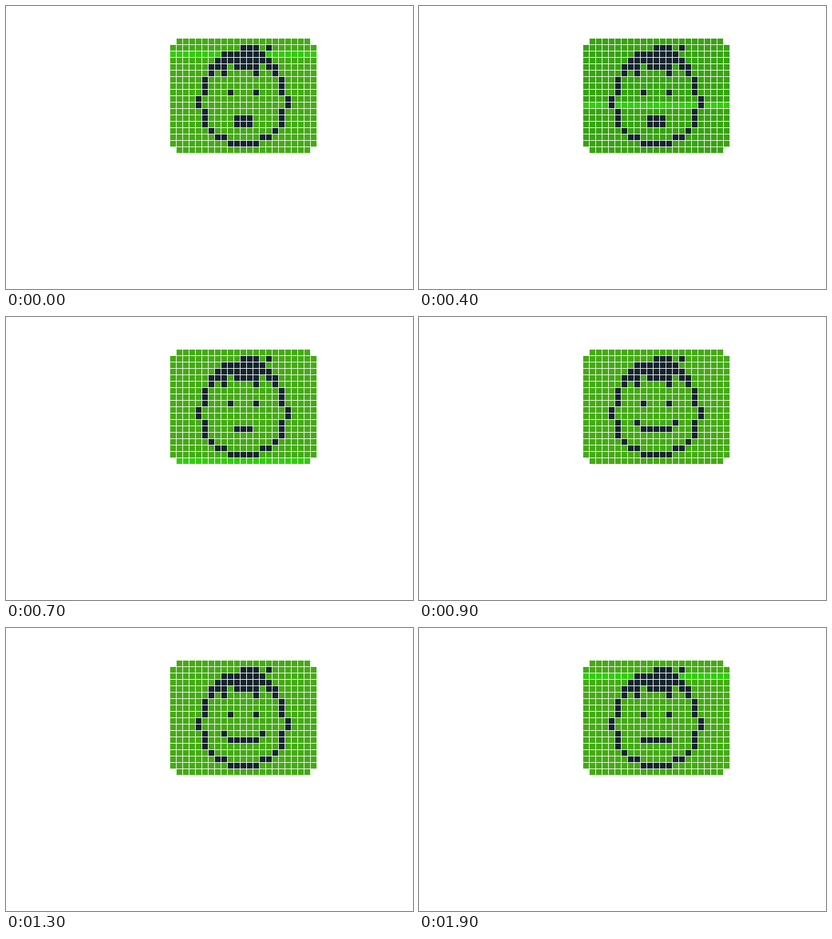
Write an HTML page that moves like this. It is 637 px wide and 443 px high and loops after 2100 ms.

```html
<!DOCTYPE html>
<html lang="en">
<head>
<meta charset="utf-8">
<title>Pixel face</title>
<style>
  html, body { margin: 0; width: 100%; height: 100%; overflow: hidden; background: #fff; }
  svg { display: block; }
</style>
</head>
<body>
<svg id="stage" width="637" height="443" viewBox="0 0 637 443" shape-rendering="crispEdges"></svg>
<script>
const LOOP = 2100, COLS = 23, ROWS = 18, CELL = 9, PITCH = 10, LEFT = 257, TOP = 51;
const INK = '#14242d', GLOW = '#33cc0c';
const DARK = [36, 153, 10], LIGHT = [68, 170, 20];

// One string per row of the head, starting at column 4, row 1.
const HEAD = [
  '.......###.#...',
  '....#######....',
  '...#########...',
  '..###.####.##..',
  '..#.#....#..#..',
  '.#...........#.',
  '.#...........#.',
  '.#...#...#...#.',
  '#.............#',
  '#.............#',
  '.#...........#.',
  '.#...........#.',
  '.#...........#.',
  '..#.........#..',
  '...##.....##...',
  '.....#####.....'
];

// Mouths start at column 8, row 11.
const MOUTHS = {
  open: ['.......', '..###..', '..###..'],
  shut: ['.......', '..###..'],
  smile: ['#.....#', '.#####.'],
  flat: ['.......', '.#####.']
};

const SCAN = [2, 8, 14, 4, 10, 16, 10, 17, 3];

const stage = document.getElementById('stage');
const cells = [];
for (let row = 0; row < ROWS; row++) {
  for (let col = 0; col < COLS; col++) {
    const edgeRow = row === 0 || row === ROWS - 1;
    const edgeCol = col === 0 || col === COLS - 1;
    if (edgeRow && edgeCol) continue;
    const el = document.createElementNS('http://www.w3.org/2000/svg', 'rect');
    el.setAttribute('x', LEFT + col * PITCH);
    el.setAttribute('y', TOP + row * PITCH);
    el.setAttribute('width', CELL);
    el.setAttribute('height', CELL);
    stage.appendChild(el);
    cells.push({ el, row, col, fill: '' });
  }
}

const inked = (art, row, col) => art[row] !== undefined && art[row][col] === '#';

function baseColor(step) {
  const k = step === 0 ? 1 : Math.min(1, (step - 1) / 5);
  return `rgb(${DARK.map((d, i) => Math.round(d + (LIGHT[i] - d) * k))})`;
}

function pose(step) {
  if (step < 9) {
    return { mouth: step % 2 ? 'shut' : 'open', lift: 0, scan: SCAN[step] };
  }
  if (step < 19) {
    return { mouth: 'smile', lift: Math.floor((step - 9) / 2) % 2, scan: -1 };
  }
  return { mouth: 'flat', lift: 0, scan: 2 };
}

function draw(time) {
  const step = Math.floor((time % LOOP) / 100);
  const { mouth, lift, scan } = pose(step);
  const base = baseColor(step);
  for (const cell of cells) {
    const row = cell.row + lift;
    const ink = inked(HEAD, row - 1, cell.col - 4) || inked(MOUTHS[mouth], row - 11, cell.col - 8);
    const fill = ink ? INK : cell.row === scan ? GLOW : base;
    if (fill !== cell.fill) {
      cell.fill = fill;
      cell.el.setAttribute('fill', fill);
    }
  }
}

const start = performance.now();
function tick() {
  draw(performance.now() - start);
  requestAnimationFrame(tick);
}
tick();
</script>
</body>
</html>
```
